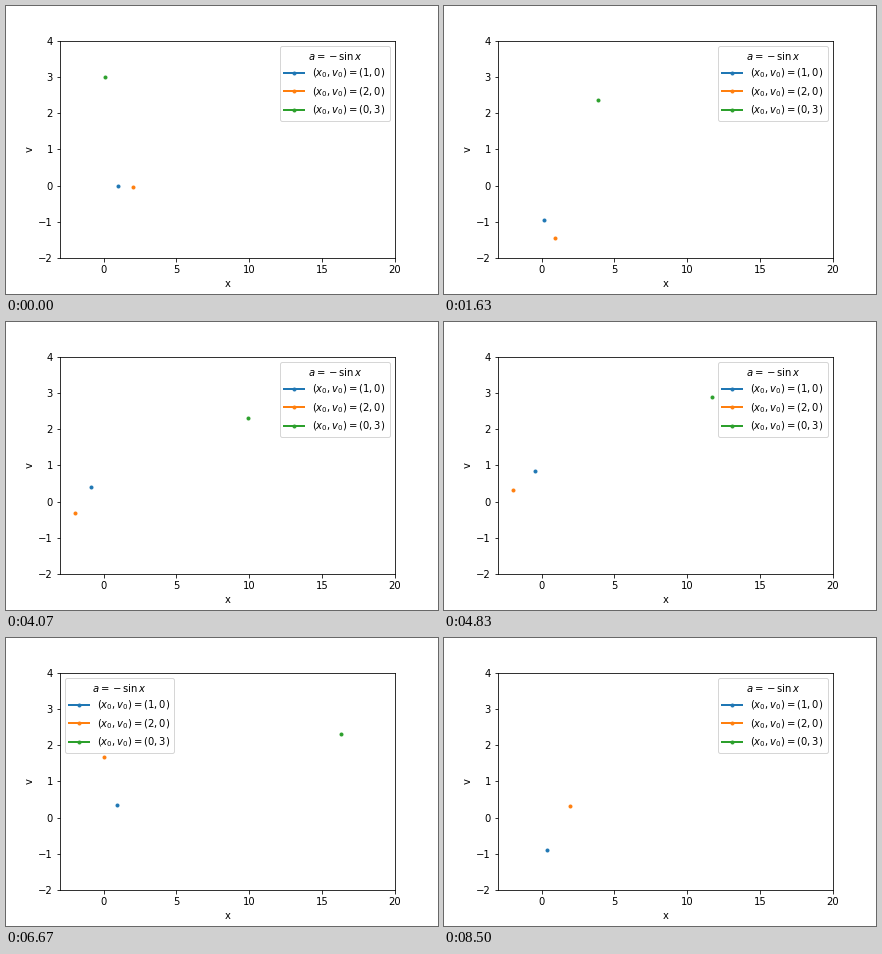
Animation of 432x288 px, one loop 8530 ms. Source, as a matplotlib script:

```python
import matplotlib.pyplot as plt
import numpy as np
from matplotlib.animation import FuncAnimation

FRAMES = 256
LOOP_MS = 8530
DT = 1 / 32
STARTS = [(1, 0), (2, 0), (0, 3)]


def deriv(state):
    x, v = state
    return np.array([v, -np.sin(x)])


def rk4_step(state, h):
    k1 = deriv(state)
    k2 = deriv(state + h / 2 * k1)
    k3 = deriv(state + h / 2 * k2)
    k4 = deriv(state + h * k3)
    return state + h / 6 * (k1 + 2 * k2 + 2 * k3 + k4)


def simulate():
    """Return states of all pendulums, shape (FRAMES, 2, len(STARTS))."""
    state = np.array(STARTS, dtype=float).T
    path = []
    for _ in range(FRAMES):
        state = rk4_step(state, DT)
        path.append(state)
    return np.array(path)


path = simulate()

fig, ax = plt.subplots(figsize=(6, 4), dpi=72)
fig.subplots_adjust(left=0.125, right=0.9, bottom=0.125, top=0.88)
ax.set(xlim=(-3, 20), ylim=(-2, 4), xlabel="x", ylabel="v")

lines = [
    ax.plot([], [], ".-", lw=2, label=rf"$(x_0,v_0)=({x0},{v0})$")[0]
    for x0, v0 in STARTS
]
# "best" lets the legend jump aside when a point runs into it
ax.legend(title=r"$a=-\sin x$", loc="best")


def update(i):
    for line, x, v in zip(lines, *path[i]):
        line.set_data([x], [v])
    return lines


ani = FuncAnimation(fig, update, frames=FRAMES, interval=LOOP_MS / FRAMES,
                    init_func=lambda: update(0), repeat=True, repeat_delay=0)
plt.show()
```
